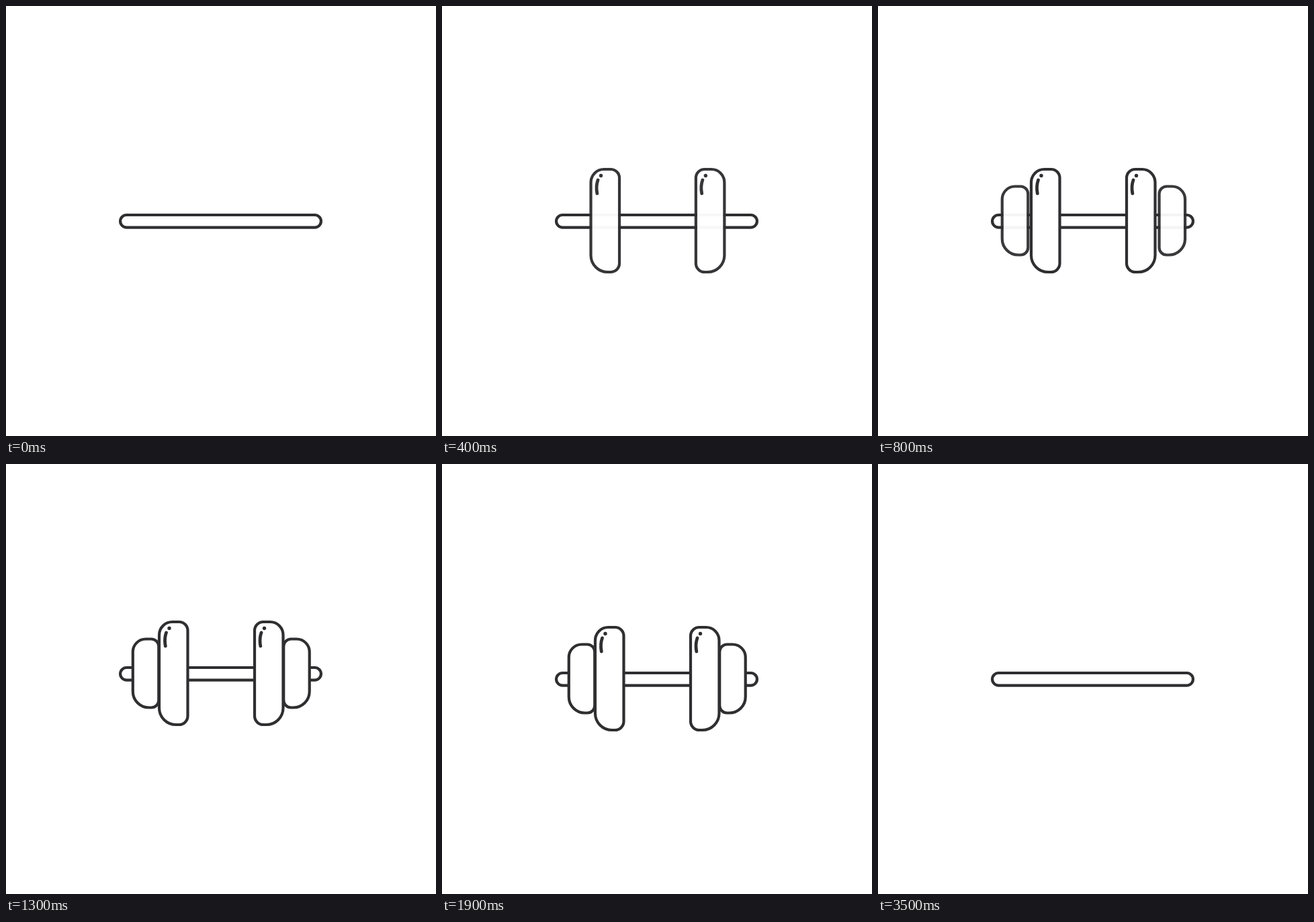
Animation, 640 px wide and 640 px high, one loop 3600 ms. Source, as an HTML page:

```html
<!DOCTYPE html>
<html lang="en">
<head>
<meta charset="utf-8">
<title>Dumbbell</title>
<style>
  html, body { margin: 0; height: 100%; overflow: hidden; background: #fff; }
  svg { display: block; width: 100%; height: 100%; }
  .line { fill: #fff; stroke: #2f2e30; stroke-width: 4.2; }
  .shine { fill: none; stroke: #2f2e30; stroke-width: 4.8; stroke-linecap: round; }
  .dot { fill: #2f2e30; }
</style>
</head>
<body>
<svg viewBox="0 0 640 640">
  <defs>
    <path id="small" class="line" d="M208 268.5H216.3A11 11 0 0 1 227.3 279.5V359.5A11 11 0 0 1 216.3 370.5H212.8A24 24 0 0 1 188.8 346.5V287.7A19.2 19.2 0 0 1 208 268.5Z"/>
    <path id="big" class="line" d="M247.5 243H257.5A13 13 0 0 1 270.5 256V383A13 13 0 0 1 257.5 396H253A25 25 0 0 1 228 371V262.5A19.5 19.5 0 0 1 247.5 243Z"/>
    <g id="gloss">
      <circle class="dot" cx="243" cy="252.5" r="2.7"/>
      <path class="shine" d="M238.5 259Q235.2 268 237.3 279"/>
    </g>
  </defs>
  <g id="all">
    <rect class="line" x="170.1" y="311" width="298.8" height="18.6" rx="9.3"/>
    <g id="smallL"><use href="#small"/></g>
    <g id="smallR"><use href="#small" transform="matrix(-1 0 0 1 640.5 0)"/></g>
    <g id="bigL"><use href="#big"/><use href="#gloss"/></g>
    <g id="bigR"><use href="#big" transform="matrix(-1 0 0 1 640.5 0)"/><use href="#gloss" x="141.5"/></g>
  </g>
</svg>
<script>
const LOOP = 3600, STEP = 100;
const el = id => document.getElementById(id);
const progress = (t, from, to) => Math.min(1, Math.max(0, (t - from) / (to - from)));
const smooth = u => (1 - Math.cos(Math.PI * u)) / 2;

// Slide a plate in from the side while it fades in.
function place(id, distance, rest, fade) {
  el(id).setAttribute("transform", `translate(${distance * rest} 0)`);
  el(id).setAttribute("opacity", (1 - rest) * fade);
}

function draw(t) {
  const bigRest = (1 - progress(t, 0, 600)) ** 3;
  const smallRest = (1 - progress(t, 600, 1000)) ** 4.35;
  const fade = 1 - progress(t, 3100, 3500) ** 2;
  const lift = smooth(progress(t, 1200, 1500)) - smooth(progress(t, 1600, 1900));

  place("bigL", -174, bigRest, fade);
  place("bigR", 212, bigRest, fade);
  place("smallL", -82, smallRest, fade);
  place("smallR", 109, smallRest, fade);
  el("all").setAttribute("transform", `translate(0 ${-32 * lift})`);
}

const start = performance.now();
function tick() {
  const t = (performance.now() - start) % LOOP;
  draw(Math.floor(t / STEP) * STEP);
  requestAnimationFrame(tick);
}
tick();
</script>
</body>
</html>
```
